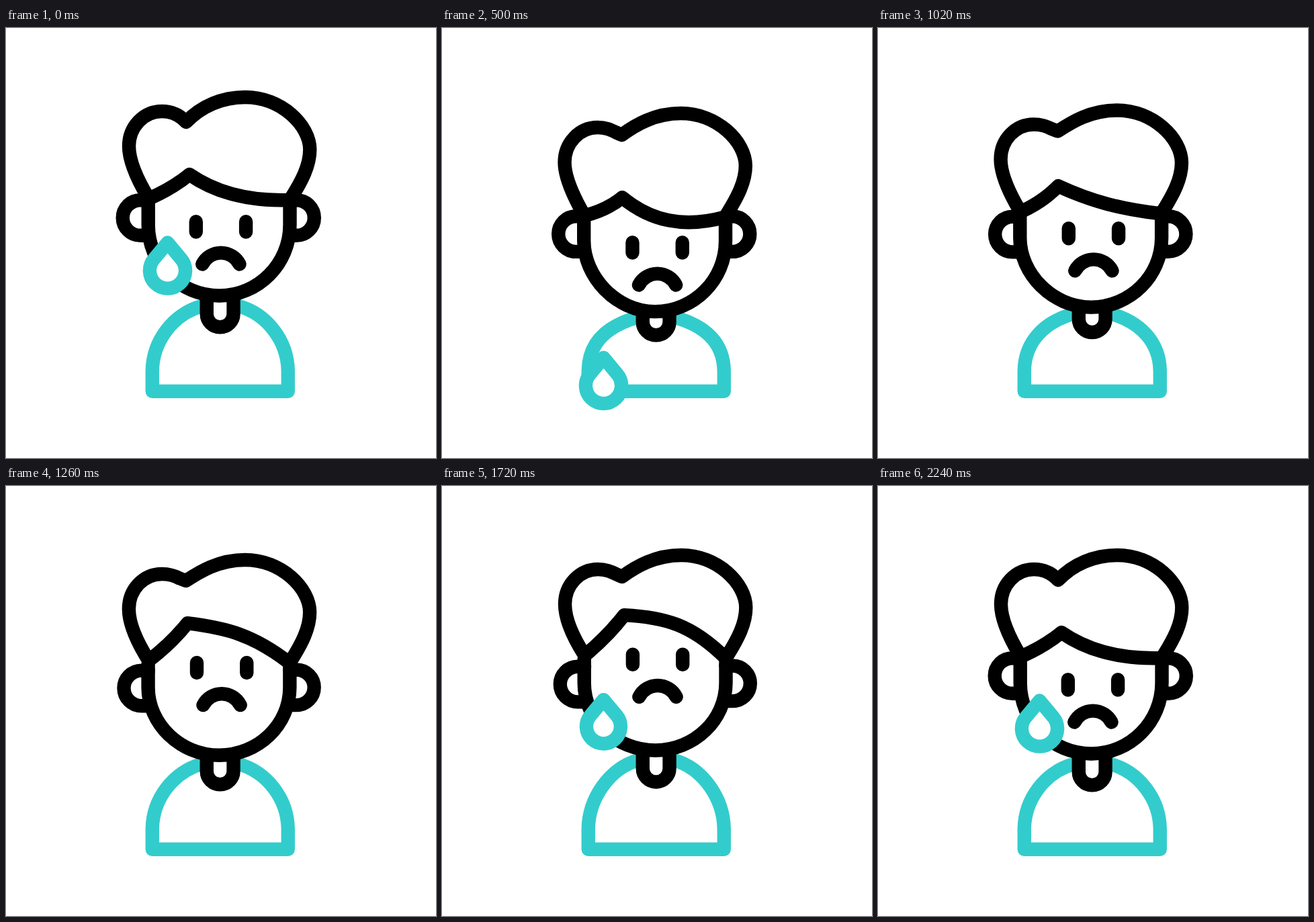
Write an HTML page that moves like this. It is 640 by 640 pixels and loops after 2400 ms.

```html
<!DOCTYPE html>
<html lang="en">
<head>
<meta charset="utf-8">
<title>Crying boy</title>
<style>
  html, body { margin: 0; width: 100%; height: 100%; overflow: hidden; background: #fff; }
  svg { display: block; width: 100vw; height: 100vh; }
  path { fill: none; stroke: #000; stroke-width: 20.4; stroke-linecap: round; stroke-linejoin: round; }
  .teal { stroke: #33cccc; }
  .solid { fill: #fff; }
</style>
</head>
<body>
<svg viewBox="0 0 640 640">
  <path id="shirt" class="teal"/>
  <path id="neck" class="solid"/>
  <g id="head">
    <path id="ears"/>
    <path id="face"/>
    <path id="hair"/>
    <path id="features"/>
  </g>
  <path id="drop" class="teal solid"/>
</svg>
<script>
const LOOP = 2400;
const el = id => document.getElementById(id);
const draw = (id, d) => el(id).setAttribute('d', d);

const ease = (t, a, b) => {
  const x = Math.min(1, Math.max(0, (t - a) / (b - a)));
  return x * x * (3 - 2 * x);
};

const ear = (x, y, dir) =>
  `M${x + 10 * dir} ${y - 26.3}H${x}a26.3 26.3 0 0 ${dir > 0 ? 0 : 1} 0 52.6H${x + 10 * dir}`;

// bow: head sinks and looks down; lift: face turns up. Both run 0..1.
function drawHead(bow, lift) {
  el('head').setAttribute('transform', `translate(${-0.6 * bow} ${29.5 * bow})`);

  // The parting moves most, the fringe ends stay near the ears.
  const flat = bow + lift;
  const px = 273 - 5.4 * bow - 2 * lift, py = 218 + 12.5 * bow - 31 * lift;
  const sweep = 20 * bow - 62 * lift;
  const lx = 212.5, ly = 254 + 1.5 * bow - 2 * lift;
  draw('hair', `M${lx} ${ly}C195 225 183 198 183 176
    C183 147 205 124 232 124
    C${246 + 3 * flat} 124 ${259 - 4 * flat} 130 268 ${140 - 6 * flat}
    C${291 - 3 * flat} ${116 + 5 * flat} ${322 - 6 * flat} 103 356 103
    C410 103 452.3 145 452.3 181
    C452.3 205 440 228 425 252
    L422 ${256 + 1.5 * bow}
    C${365 - 7 * bow + 8 * lift} ${258 + sweep} ${315 - 4 * bow + 20 * lift} ${247 + sweep} ${px} ${py}
    Q${(px + lx) / 2 + 5} ${(py + ly) / 2 + 3 + 3 * bow - 2 * lift} ${lx} ${ly}Z`);

  const top = 293, chin = 398.5 - 0.5 * bow - 6 * lift, depth = chin - top;
  draw('face', `M211.7 258V${top}
    C211.7 ${top + depth * (0.55 - 0.07 * bow)} 259 ${chin} 317.5 ${chin}
    C375.5 ${chin} 422.5 ${top + depth * 0.55} 422.5 ${top}V258`);

  draw('ears', ear(200 + 2.5 * lift, 282.5 + 15 * lift, 1) + ear(432.5, 282.5 + 13.5 * lift, -1));

  const dx = 1.4 * bow + 1.3 * lift, dy = 8.5 * bow - 45 * lift;
  const eye = x => `M${x + dx} ${288.3 + dy}v15.2`;
  draw('features', eye(282.8) + eye(357.1) +
    `M${292.3 + dx} ${351.5 + dy}a31 31 0 0 1 55.2 0`);
}

function drawBody(bow, lift) {
  // The collar follows the head while the sides stand still.
  const mid = 318.75, collar = 413.4 + 20.5 * bow - 6.5 * lift;
  const x = dx => `${mid + dx} `;
  draw('shirt', `M${x(-26)}${collar}C${x(-70)}${collar + 12} ${x(-101)}466 ${x(-101)}512
    V540.7H${x(101)}V512C${x(101)}466 ${x(70)}${collar + 12} ${x(26)}${collar}`);

  const neckTop = 402.5 + 29 * bow - 6 * lift;
  draw('neck', `M${x(-20)}${neckTop}V${425.4 + 14.7 * bow - 5.8 * lift}
    a19.9 19.9 0 0 0 39.8 0V${neckTop}`);
}

// The tear falls off the stage, then a new one grows under the eye.
function drawDrop(t) {
  const ramp = 262, speed = 0.4627;
  const falling = t < 900;
  const fall = falling ? speed * (t < ramp ? t * t / (2 * ramp) : t - ramp / 2) : 0;
  const s = falling ? 1 : ease(t, 1300, 1780);
  const x = 238.7 + 1.8 * s, y = 286.5 + 74.5 * s + fall;
  const r = 26.6 * s, tx = 20.4 * s, ty = y - 17 * s;
  draw('drop', s ? `M${x} ${y - 41.5 * s}L${x + tx} ${ty}A${r} ${r} 0 1 1 ${x - tx} ${ty}Z` : '');
}

const begin = performance.now();
function frame() {
  const t = (performance.now() - begin) % LOOP;
  const raise = ease(t, 700, 1520);
  const bow = ease(t, 0, 690) - raise;
  const lift = raise - ease(t, 1540, 2245);
  drawBody(Math.max(0, bow), lift);
  drawHead(Math.max(0, bow), lift);
  drawDrop(t);
  requestAnimationFrame(frame);
}
frame();
</script>
</body>
</html>
```
